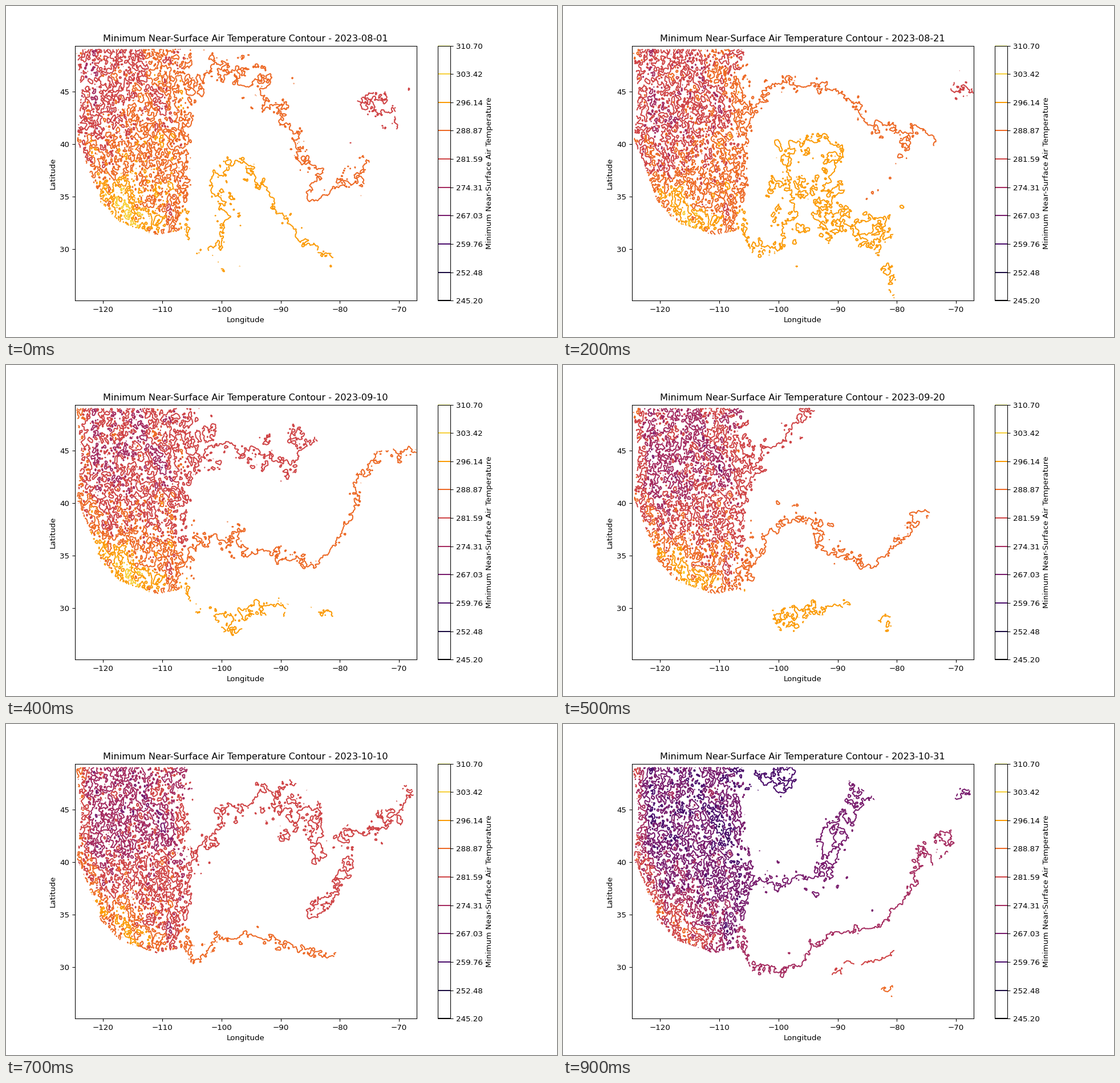
A matplotlib script that plays this animation: 966x580 px, repeating every 1000 ms.

```python
import numpy as np
import matplotlib.pyplot as plt
from matplotlib.animation import FuncAnimation
from matplotlib.path import Path

plt.rcParams["font.family"] = "DejaVu Sans"

LEVELS = np.linspace(245.2, 310.7, 10)
DAYS = (0, 10, 20, 30, 40, 50, 60, 70, 80, 91)
LON, LAT = (-124.767, -67.058), (25.067, 49.4)
X_EDGES, Y_EDGES = (120.75, 719.67), (516.2, 69.6)

fig = plt.figure(figsize=(10.0001, 6.0042), dpi=96.6)
ax = fig.add_subplot()
ax.set(xlim=LON, ylim=LAT, xlabel="Longitude", ylabel="Latitude")

# Work in stage pixels, draw in degrees.
X, Y = np.meshgrid(np.linspace(*X_EDGES, 480), np.linspace(*Y_EDGES, 358))
GRID_LON, GRID_LAT = np.meshgrid(np.linspace(*LON, 480), np.linspace(*LAT, 358))
STEP = X[0, 1] - X[0, 0]

BORDER = np.reshape((
    122, 75, 132, 150, 124, 235, 144, 284, 165, 343, 200, 380, 264, 402, 310, 393,
    331, 433, 346, 444, 356, 429, 383, 471, 402, 501, 405, 475, 432, 438, 489, 442,
    492, 420, 544, 426, 565, 490, 581, 514, 585, 485, 570, 420, 596, 366, 631, 325,
    627, 298, 648, 248, 689, 213, 681, 187, 720, 154, 712, 108, 698, 106, 678, 148,
    637, 151, 596, 178, 560, 205, 554, 142, 539, 123, 497, 96, 430, 75), (-1, 2))
LAND = Path(BORDER).contains_points(np.c_[X.ravel(), Y.ravel()]).reshape(X.shape)

# Background warmth at twenty stations, counted in contour levels.
STATIONS = np.reshape((
    150, 120, 210, 230, 215, 355, 265, 120, 330, 370,
    390, 100, 370, 230, 400, 320, 395, 440, 480, 140,
    480, 240, 460, 330, 480, 425, 545, 150, 555, 250,
    545, 350, 570, 460, 615, 280, 650, 180, 705, 125), (-1, 2))
READINGS = {
    0: (5.2, 5.9, 6.9, 5.7, 6.6, 6.0, 6.6, 7.3, 7.1, 5.8,
        6.3, 7.0, 7.4, 5.7, 5.7, 6.4, 7.1, 5.9, 5.0, 4.8),
    20: (5.2, 5.1, 6.5, 5.4, 6.7, 5.7, 6.7, 7.1, 7.2, 5.9,
         7.0, 7.1, 7.1, 5.6, 6.2, 6.8, 7.1, 6.5, 5.5, 4.9),
    30: (5.1, 5.0, 6.7, 4.9, 6.3, 5.9, 6.0, 6.3, 6.9, 5.0,
         5.4, 5.9, 7.0, 5.1, 5.3, 6.3, 7.2, 5.8, 5.1, 5.0),
    40: (5.1, 5.0, 6.7, 4.9, 6.4, 4.8, 5.5, 6.1, 6.9, 4.9,
         5.5, 6.0, 7.0, 5.2, 5.5, 6.2, 7.1, 6.3, 6.1, 5.7),
    60: (4.1, 4.2, 5.9, 4.2, 6.0, 5.1, 5.8, 6.5, 7.0, 6.0,
         6.0, 6.2, 6.9, 5.5, 5.5, 6.0, 7.0, 5.6, 5.0, 5.2),
    80: (5.0, 4.9, 5.9, 4.3, 5.4, 4.4, 4.5, 5.1, 6.0, 4.0,
         4.8, 5.1, 6.0, 4.4, 4.7, 5.0, 6.1, 5.2, 5.0, 4.9),
    91: (3.2, 3.1, 4.5, 2.9, 3.6, 2.0, 2.7, 3.4, 4.1, 2.9,
         3.1, 3.5, 4.9, 3.2, 3.4, 4.0, 6.0, 4.0, 3.8, 3.1),
}


def softened(dx, dy):
    return np.sqrt(dx**2 + dy**2 + 30**2)


def spread(values):
    """Smooth surface through the station values."""
    sx, sy = STATIONS.T
    kernel = softened(np.subtract.outer(sx, sx), np.subtract.outer(sy, sy))
    mean = np.mean(values)
    weights = np.linalg.solve(kernel, values - mean)
    return mean + sum(w * softened(X - x, Y - y) for w, x, y in zip(weights, sx, sy))


def noise(seed, slope, coarse, fine, stretch=1.0):
    """Random field with a power-law spectrum, drawn out north to south."""
    kx = np.fft.fftfreq(X.shape[1], STEP)
    ky = np.fft.fftfreq(X.shape[0], STEP)[:, None]
    k = np.hypot(kx, stretch * ky)
    gain = np.exp(-((fine * k) ** 2)) / (k + 1 / coarse) ** slope
    gain[0, 0] = 0
    white = np.random.default_rng(seed).normal(size=X.shape)
    field = np.fft.ifft2(np.fft.fft2(white) * gain).real
    return field / field.std()


def ridge(width, *points):
    """Bell-shaped band along a path of key points."""
    p = np.reshape(points, (-1, 2))
    t = np.linspace(0, len(p) - 1, 16 * len(p))
    gap = np.full(X.shape, np.inf)
    for x, y in zip(*(np.interp(t, range(len(p)), c) for c in p.T)):
        gap = np.minimum(gap, (X - x) ** 2 + (Y - y) ** 2)
    return np.exp(-gap / width**2)


sierra = ridge(10, 152, 80, 158, 200, 190, 320)
rockies = ridge(14, 225, 110, 270, 165, 278, 190, 308, 230, 310, 300, 292, 360)
appalachians = ridge(14, 530, 335, 575, 300, 600, 240)
valley = ridge(7, 148, 235, 178, 330)
desert = ridge(18, 190, 310, 215, 365, 265, 375)
coast = ridge(13, 130, 80, 130, 230, 160, 325)
west = 1 / (1 + np.exp((X - 322) / 8))

relief = (0.45 * west * noise(8, 1.1, 22, 3.2, 1.4)
          + (0.07 + 0.1 * appalachians) * noise(5, 1.5, 40, 3.0)
          + 0.2 * west * noise(3, 2.5, 80, 8)
          - 0.6 * sierra - 0.6 * rockies - 0.3 * appalachians
          + 0.6 * valley + 0.5 * desert)


def temperature(day):
    known = list(READINGS)
    values = [np.interp(day, known, series) for series in zip(*READINGS.values())]
    sea = -0.4 + 1.6 * day / DAYS[-1]  # the ocean cools later than the land
    weather = 0.06 * noise(100 + day, 2.5, 80, 8)
    warmth = spread(values) + relief + sea * coast + weather
    return np.ma.masked_where(~LAND, LEVELS[0] + warmth * (LEVELS[1] - LEVELS[0]))


layers = [ax.contour(GRID_LON, GRID_LAT, temperature(day), levels=LEVELS, cmap="inferno")
          for day in DAYS]
fig.colorbar(layers[0], ax=ax, format="%.2f",
             label="Minimum Near-Surface Air Temperature")
title = ax.set_title("")


def update(frame):
    for index, layer in enumerate(layers):
        layer.set_visible(index == frame)
    date = np.datetime64("2023-08-01") + DAYS[frame]
    title.set_text(f"Minimum Near-Surface Air Temperature Contour - {date}")
    return [title]


animation = FuncAnimation(fig, update, frames=len(DAYS), interval=100, repeat=True)
plt.show()
```
